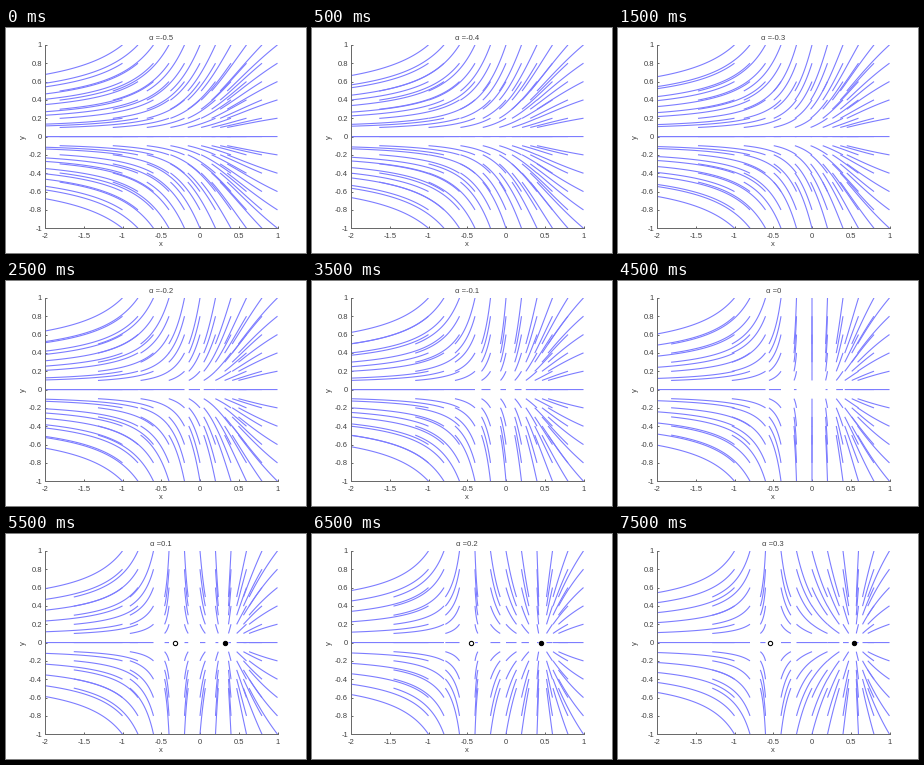
These frames come from a looping animation (300 px wide and 225 px high, 8000 ms). A matplotlib script:

```python
import numpy as np
import matplotlib.pyplot as plt
from matplotlib.animation import FuncAnimation
from matplotlib.collections import LineCollection

W, H, DPI = 300, 225, 100
STEP_MS, FRAMES = 500, 16
PX = 72 / DPI  # points per pixel
BLUE, GREY, INK = "#7c7cff", "#6a6a6a", "#404040"

plt.rcParams.update({
    "font.family": "Liberation Sans",
    "font.size": 7.7 * PX,
    "text.color": INK,
    "axes.unicode_minus": False,
})

starts = np.round(np.linspace(-1, 1, 11), 1)
times = np.linspace(0, 0.7, 141)


def flow(alpha):
    """Trajectories of x' = alpha - x^2, y' = -y from a grid of starts."""
    k = np.sqrt(complex(alpha))
    s = times if alpha == 0 else (np.tanh(k * times) / k).real
    paths = []
    for x0 in starts:
        denom = 1 + x0 * s
        ok = denom > 0.05  # stop before the blow-up
        x = (x0 + alpha * s[ok]) / denom[ok]
        decay = np.exp(-times[ok])
        paths += [np.column_stack([x, y0 * decay]) for y0 in starts]
    return paths


fig = plt.figure(figsize=(W / DPI, H / DPI), dpi=DPI, facecolor="white")
ax = fig.add_axes([0.13, 0.11, 0.775, 0.815])
ax.set_xlim(-2, 1)
ax.set_ylim(-1, 1)

xticks = np.round(np.arange(-2, 1.1, 0.5), 1)
yticks = np.round(np.arange(-1, 1.1, 0.2), 1) + 0.0
ax.set_xticks(xticks, [f"{v:g}" for v in xticks])
ax.set_yticks(yticks, [f"{v:g}" for v in yticks])
ax.tick_params(direction="in", length=2.3 * PX, width=PX,
               color=GREY, labelcolor=INK)
ax.tick_params(axis="x", pad=4.7 * PX)
ax.tick_params(axis="y", pad=3 * PX)
for side in ("top", "right"):
    ax.spines[side].set_visible(False)
for side in ("left", "bottom"):
    ax.spines[side].set(linewidth=PX, color=GREY)


def label(x, y, text, **kw):
    return fig.text(x / W, 1 - y / H, text, ha="center", **kw)


label(155, 217.5, "x", va="baseline")
label(17.8, 108.6, "y", va="center", rotation=90)
title = label(155.3, 12, "", va="baseline")

curves = LineCollection([], colors=BLUE, linewidths=1.1 * PX, snap=False)
ax.add_collection(curves, autolim=False)

dot = dict(marker="o", ms=4.3 * PX, mec="black", mew=1.07 * PX, ls="none", zorder=5)
source, = ax.plot([], [], mfc="white", **dot)
sink, = ax.plot([], [], mfc="black", **dot)


def update(i):
    alpha = round(-0.5 + 0.1 * ((i + 1) // 2), 1) + 0.0
    title.set_text(f"α =\u200a{alpha:g}".replace("\u200a", ""))
    curves.set_segments(flow(alpha))
    root = [np.sqrt(alpha)] if alpha > 0 else []
    source.set_data([-r for r in root], [0] * len(root))
    sink.set_data(root, [0] * len(root))
    return curves, source, sink, title


anim = FuncAnimation(fig, update, frames=FRAMES, interval=STEP_MS,
                     repeat=True, repeat_delay=0, blit=False)
plt.show()
```
